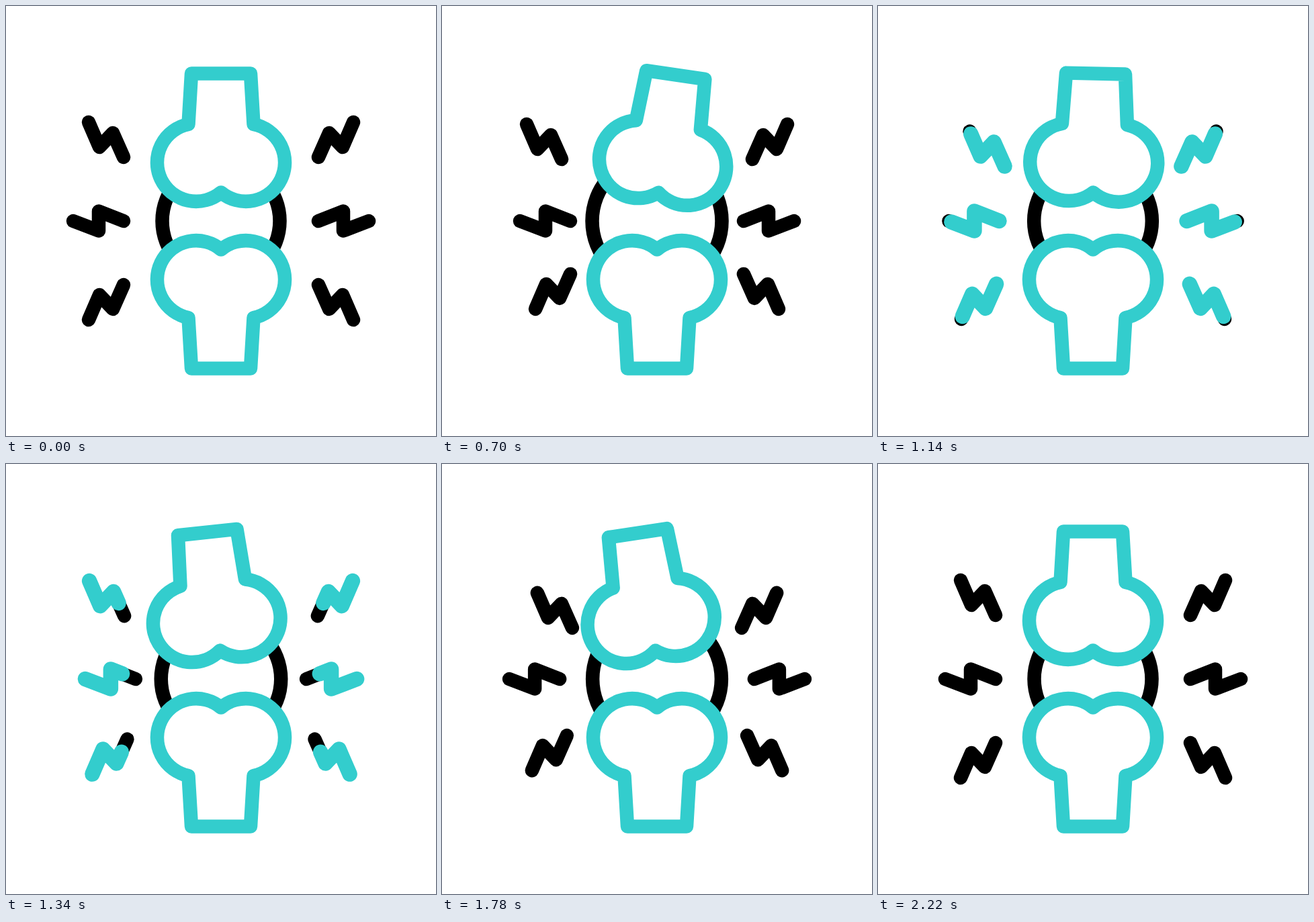
Write an HTML page that moves like this. It is 640x640 px and loops after 2.4 s.

```html
<!DOCTYPE html>
<html lang="en">
<head>
<meta charset="utf-8">
<title>Joint pain</title>
<style>
html, body { margin: 0; width: 100%; height: 100%; overflow: hidden; background: #fff; }
svg { display: block; width: 100%; height: 100%; }
path, circle { fill: none; stroke-linecap: round; stroke-linejoin: round; }
.ink { stroke: #000; stroke-width: 20.5; }
.glow { stroke: #33cdcd; stroke-width: 22.5; }
.bone { stroke: #33cdcd; stroke-width: 20.5; fill: #fff; }
</style>
</head>
<body>
<svg viewBox="0 0 640 640">
  <defs>
    <path id="bone" class="bone" d="M276 100.5H364L368.5 176A58 58 0 1 1 320 277.5A58 58 0 1 1 271.5 176Z"/>
  </defs>
  <circle id="ring" class="ink" cx="320" cy="320" r="87.5"/>
  <use id="upper" href="#bone"/>
  <use href="#bone" transform="translate(0 640) scale(1 -1)"/>
  <g id="left"></g>
  <g id="right" transform="translate(640 0) scale(-1 1)"></g>
</svg>
<script>
const LOOP = 2400;
const NS = 'http://www.w3.org/2000/svg';
const $ = id => document.getElementById(id);

// Each bolt runs from its outer tip inwards; dy is its vertical drift.
const SHAPES = [
  { d: 'M123 173L139 210L159 189L175 225', dy: 1, delay: 400 },
  { d: 'M100 320L138 334.5V305.5L175 320', dy: 0, delay: 0 },
  { d: 'M123 467L139 430L159 451L175 415', dy: -1, delay: 200 }
];

function addPath(parent, cls, d) {
  const p = document.createElementNS(NS, 'path');
  p.setAttribute('class', cls);
  p.setAttribute('d', d);
  p.setAttribute('pathLength', 100);
  parent.appendChild(p);
  return p;
}

const bolts = [];
for (const side of ['left', 'right']) {
  for (const shape of SHAPES) {
    const g = document.createElementNS(NS, 'g');
    $(side).appendChild(g);
    addPath(g, 'ink', shape.d);
    bolts.push({ ...shape, g, glow: addPath(g, 'glow', shape.d) });
  }
}

// Eased 0..1 between two times
function ease(t, from, to) {
  const s = Math.min(1, Math.max(0, (t - from) / (to - from)));
  return s * s * (3 - 2 * s);
}

// Two swings 0 -> 1 -> 0, each half lasting `half` ms
function pulse(t, start, half) {
  const at = n => start + n * half;
  return ease(t, at(0), at(1)) - ease(t, at(1), at(2))
       + ease(t, at(2), at(3)) - ease(t, at(3), at(4));
}

function draw(t) {
  const angle = 9 * ease(t, 200, 800) - 20 * ease(t, 800, 1600) + 11 * ease(t, 1600, 2200);
  $('upper').setAttribute('transform', `rotate(${angle} 320 292)`);
  $('ring').setAttribute('r', 87.5 + 9 * pulse(t, 200, 500));

  const head = 100 * (1 - ease(t, 700, 1200));
  const tail = 100 * (1 - ease(t, 1200, 1700));
  const lit = tail - head;

  for (const b of bolts) {
    const m = 19 * pulse(t, 200 + b.delay, 400);
    b.g.setAttribute('transform', `translate(${m} ${m * b.dy})`);
    b.glow.style.display = lit > 0.01 ? '' : 'none';
    b.glow.setAttribute('stroke-dasharray', `${lit} 300`);
    b.glow.setAttribute('stroke-dashoffset', -head);
  }
}

const begin = performance.now();
function tick() {
  draw((performance.now() - begin) % LOOP);
  requestAnimationFrame(tick);
}
draw(0);
requestAnimationFrame(tick);
</script>
</body>
</html>
```
